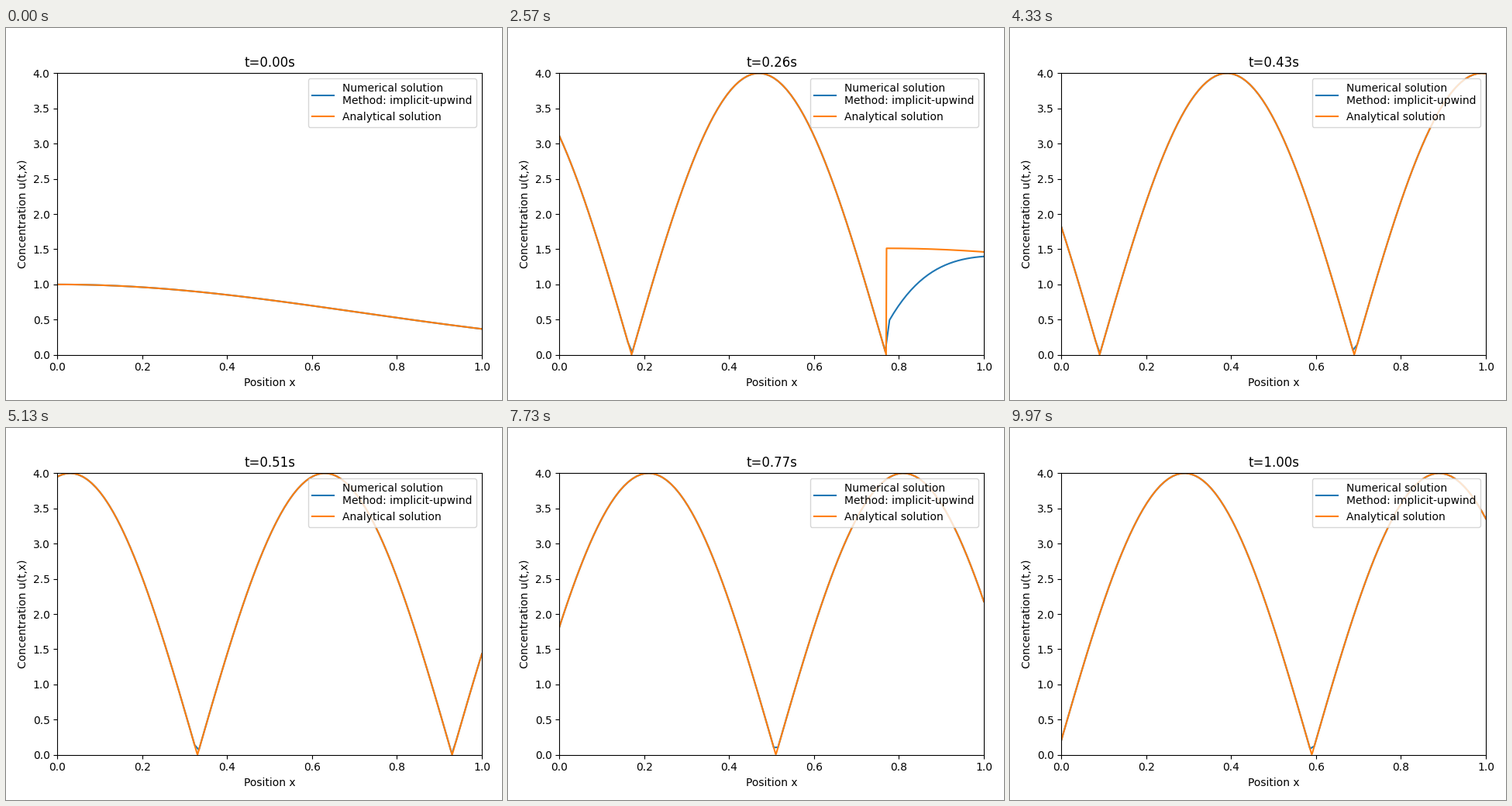
A matplotlib script that plays this animation: 640x480 px, repeating every 10 s.

```python
"""Advection with a source: implicit upwind scheme against the exact solution."""
import numpy as np
import matplotlib.pyplot as plt
from matplotlib.animation import FuncAnimation

SPEED = 3.0
SOURCE = 2.0
FRAMES = 300
LOOP_MS = 10000
DT = 1 / FRAMES


def inflow(t):
    return 4 * np.abs(np.sin(5 * np.pi * t))


def exact(t, x):
    shift = x - SPEED * t
    return np.where(shift < 0, inflow(-shift / SPEED),
                    np.exp(-shift**2) + SOURCE * t)


def solve_upwind(x):
    """Return the numerical solution for every time step."""
    n = len(x)
    courant = SPEED * DT / (x[1] - x[0])
    matrix = (1 + courant) * np.eye(n) - courant * np.eye(n, k=-1)
    matrix[0] = np.eye(n)[0]
    inverse = np.linalg.inv(matrix)

    states = [exact(0, x)]
    for step in range(1, FRAMES):
        t = step * DT
        rhs = states[-1] + DT * SOURCE
        rhs[0] = inflow(t)
        u = inverse @ rhs
        # Behind the front the inflow fixes the solution.
        states.append(np.where(x < SPEED * t, exact(t, x), u))
    return states


x_grid = np.linspace(0, 1, 100)
x_fine = np.linspace(0, 1, 1000)
states = solve_upwind(x_grid)

fig, ax = plt.subplots(figsize=(6.4, 4.8), dpi=100)
numerical, = ax.plot(x_grid, states[0],
                     label="Numerical solution\nMethod: implicit-upwind")
analytical, = ax.plot(x_fine, exact(0, x_fine), label="Analytical solution")
ax.set(xlim=(0, 1), ylim=(0, 4),
       xlabel="Position x", ylabel="Concentration u(t,x)")
title = ax.set_title("t=0.00s")
ax.legend(loc="upper right")
fig.tight_layout()
fig.subplots_adjust(top=1 - 58.4 / 480)


def update(frame):
    t = frame * DT
    numerical.set_ydata(states[frame])
    analytical.set_ydata(exact(t, x_fine))
    title.set_text(f"t={t:.2f}s")
    return numerical, analytical, title


anim = FuncAnimation(fig, update, frames=FRAMES, interval=LOOP_MS / FRAMES,
                     repeat=True, repeat_delay=0, blit=False)
plt.show()
```
